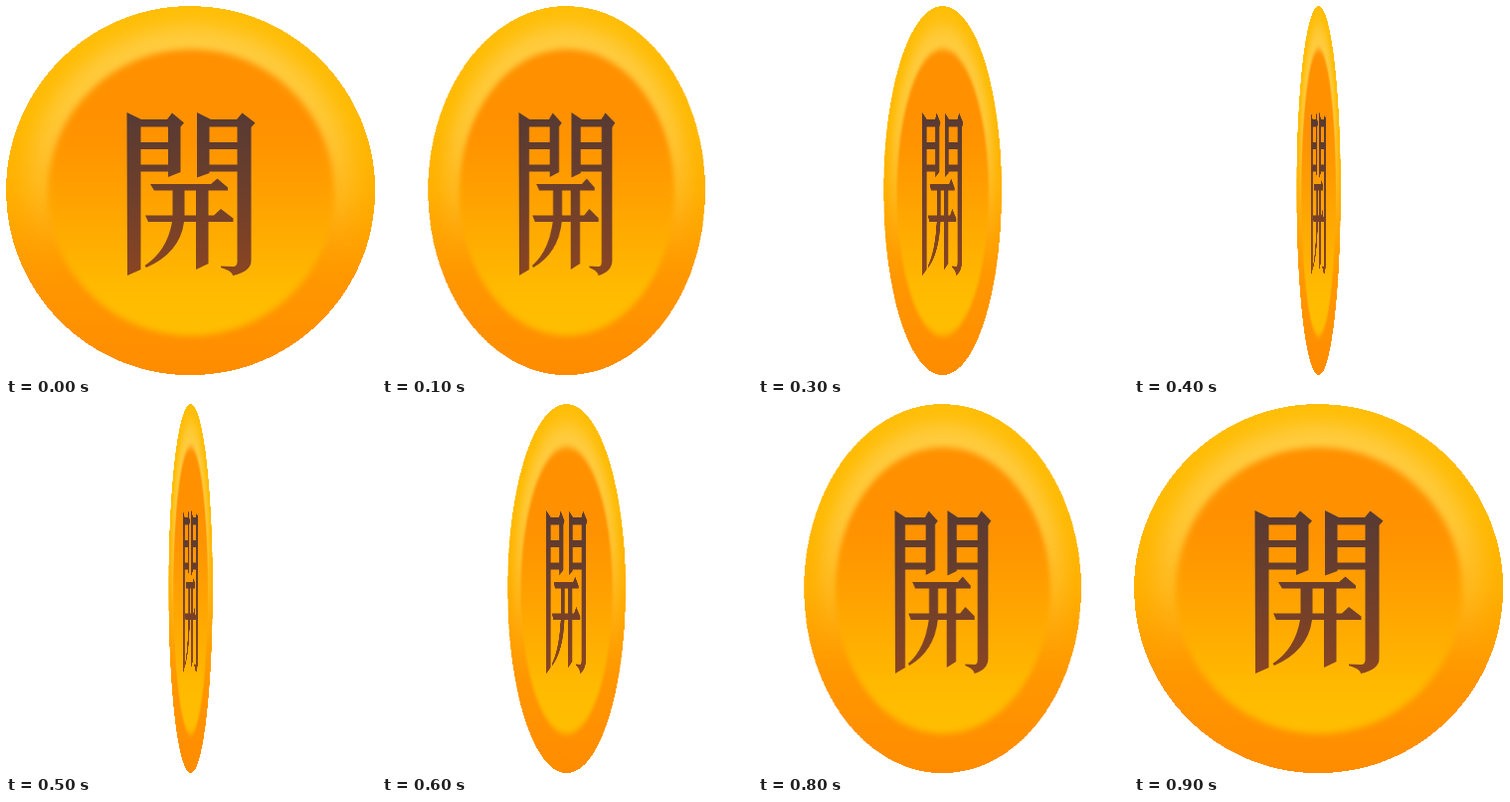
Animation, 372 px wide and 372 px high, one loop 1 s. Source, as an HTML page:

```html
<!DOCTYPE html>
<html lang="zh-Hant">
<head>
<meta charset="utf-8">
<title>開</title>
<style>
  html, body { margin: 0; width: 100%; height: 100%; overflow: hidden; background: #fff; }
  svg { display: block; width: 100vw; height: 100vh; }
  .coin { transform-origin: 185.6px 185.6px; animation: spin 1s step-end infinite; }
  @keyframes spin {
    0%   { transform: scaleX(1); }
    10%  { transform: scaleX(.751); }
    20%  { transform: scaleX(.536); }
    30%  { transform: scaleX(.32); }
    40%  { transform: scaleX(.12); }
    60%  { transform: scaleX(.32); }
    70%  { transform: scaleX(.536); }
    80%  { transform: scaleX(.751); }
    90%, 100% { transform: scaleX(1); }
  }
</style>
</head>
<body>
<svg viewBox="0 0 372 372" role="img" aria-label="開">
  <defs>
    <linearGradient id="rim" x1="0" y1="0" x2="0" y2="1">
      <stop offset="0" stop-color="#ffbe06"/>
      <stop offset=".3" stop-color="#ffba02"/>
      <stop offset=".5" stop-color="#ffb000"/>
      <stop offset=".74" stop-color="#ff9700"/>
      <stop offset="1" stop-color="#ff8c00"/>
    </linearGradient>
    <linearGradient id="shine" x1="0" y1="0" x2="0" y2="1">
      <stop offset="0" stop-color="#fff" stop-opacity=".25"/>
      <stop offset=".35" stop-color="#fff" stop-opacity=".2"/>
      <stop offset=".7" stop-color="#fff" stop-opacity="0"/>
    </linearGradient>
    <linearGradient id="face" x1="0" y1="0" x2="0" y2="1">
      <stop offset="0" stop-color="#ff9000"/>
      <stop offset=".3" stop-color="#ff9200"/>
      <stop offset=".55" stop-color="#ffa400"/>
      <stop offset=".85" stop-color="#ffbb00"/>
      <stop offset="1" stop-color="#ffbe00"/>
    </linearGradient>
    <linearGradient id="ink" gradientUnits="userSpaceOnUse" x1="0" y1="107" x2="0" y2="271">
      <stop offset="0" stop-color="#573a33"/>
      <stop offset=".5" stop-color="#6e3f2b"/>
      <stop offset="1" stop-color="#8a4522"/>
    </linearGradient>
    <filter id="soft" x="-10%" y="-10%" width="120%" height="120%" color-interpolation-filters="sRGB">
      <feGaussianBlur stdDeviation="3.2"/>
    </filter>
    <filter id="glow" x="-20%" y="-20%" width="140%" height="140%" color-interpolation-filters="sRGB">
      <feGaussianBlur stdDeviation="10"/>
    </filter>
    <clipPath id="edge"><circle cx="185.6" cy="185.6" r="185.6"/></clipPath>
  </defs>
  <g class="coin">
    <circle cx="185.6" cy="185.6" r="185.6" fill="url(#rim)" shape-rendering="crispEdges"/>
    <g clip-path="url(#edge)">
      <circle cx="185.6" cy="186" r="166" fill="url(#shine)" filter="url(#glow)"/>
    </g>
    <circle cx="186" cy="187.500" r="144" fill="url(#face)" filter="url(#soft)"/>
    <g fill="url(#ink)" fill-rule="evenodd">
      <!-- left door -->
      <path d="M121.500 107L136 114H162L167 107.500L179 117.500L175.500 121.500V167L163 172V166.500H135.500V265L122 271ZM135.500 121.500V137H163V121.500ZM135.500 144V159.500H163V144Z"/>
      <!-- right door -->
      <path d="M192 107L206 114H232L237.500 107.500L250.500 117.500L246.500 122V256Q246.500 267 228 271Q227 266 216 263V261.500L228 262Q232.500 262 232.500 257V166.500H204.500V168L192 172.500ZM204.500 121.500V137H232.500V121.500ZM204.500 144V159.500H232.500V144Z"/>
      <!-- inner frame -->
      <path d="M145 179H206L212.500 173.500L223 182.500V185.500H203.500V210.500H209L216 204L228.500 213.500V217H203.500V259L191 265V217H179Q175 248 141 263L139.500 261Q162 246 167 217H143L140 210.500H167.500V185.500H149ZM179.500 185.500V210.500H191V185.500Z"/>
    </g>
  </g>
</svg>
</body>
</html>
```
